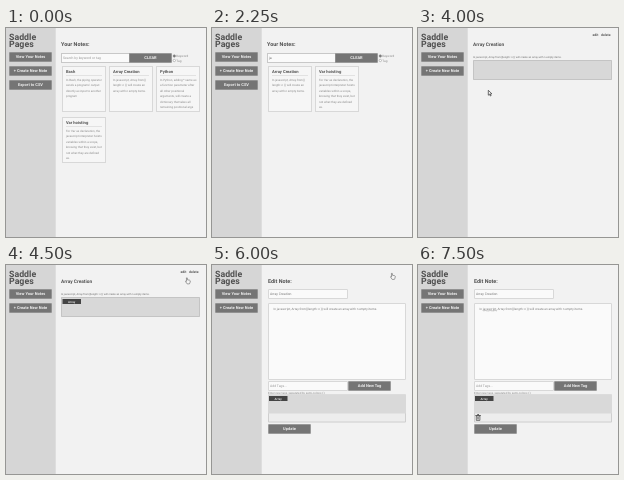
Animation, 200 px wide and 209 px high, one loop 8 s. Source, as an HTML page with a canvas:

```html
<!DOCTYPE html>
<html lang="en">
<head>
<meta charset="utf-8">
<title>Saddle Pages</title>
<style>
html, body { margin: 0; width: 100%; height: 100%; overflow: hidden; background: #f2f2f2; }
canvas { display: block; width: 200px; height: 209px; }
</style>
</head>
<body>
<canvas id="stage"></canvas>
<script>
const W = 200, H = 209, LOOP = 8000;
const canvas = document.getElementById('stage');
const ctx = canvas.getContext('2d');
const dpr = window.devicePixelRatio || 1;
canvas.width = W * dpr;
canvas.height = H * dpr;

const INK = '#505050', BODY = '#858585', BUTTON = '#757575', EDGE = '#d8d8d8', FIELD = '#fafafa';
const SNIPPET = 'In javascript, Array.from({length: n }) will create an array with n empty items.';

const NOTES = {
  bash: ['Bash', 'In Bash, the piping operator', "sends a programs' output", 'directly as input to another', 'program'],
  array: ['Array Creation', 'In javascript, Array.from({', 'length: n }) will create an', 'array with n empty items.'],
  python: ['Python', 'In Python, adding * same as', 'a function parameter after', 'all other positional', 'arguments, will create a', 'dictionary that takes all', 'remaining positional args'],
  hoist: ['Var hoisting', 'For Var as declaration, the', 'javascript interpreter hoists', 'variables within a scope,', 'knowing that they exist, but', 'not what they are defined', 'as.']
};

// Pointer steps: [start ms, kind, x, y]
const POINTER = [
  [0, 'none', 0, 0],
  [3250, 'hand', 69, 60],
  [3500, 'hand', 69, 63],
  [3750, 'hand', 69, 62],
  [4000, 'arrow', 70, 62],
  [4250, 'beam', 145, 28],
  [4500, 'hand', 179, 12.5],
  [4750, 'hand', 178, 9],
  [5000, 'hand', 178, 8],
  [6250, 'arrow', 165, 19],
  [6500, 'none', 0, 0]
];

// Glyphs are laid out large and scaled down so that tiny sizes keep true spacing.
function text(str, x, y, size, color = BODY, weight = 400, align = 'left') {
  const zoom = 10;
  ctx.save();
  ctx.translate(x, y);
  ctx.scale(1 / zoom, 1 / zoom);
  ctx.font = `${weight} ${size * zoom}px Roboto, sans-serif`;
  ctx.textRendering = 'geometricPrecision';
  ctx.textAlign = align;
  ctx.fillStyle = color;
  ctx.fillText(str, 0, 0);
  ctx.restore();
}

function rect(x, y, w, h, fill, stroke) {
  ctx.fillStyle = fill;
  ctx.fillRect(x, y, w, h);
  if (!stroke) return;
  ctx.strokeStyle = stroke;
  ctx.lineWidth = 1;
  ctx.strokeRect(x + 0.5, y + 0.5, w - 1, h - 1);
}

function button(label, x, y, w = 43, h = 10) {
  rect(x + 0.3, y + 0.3, w - 0.6, h - 0.6, BUTTON);
  text(label, x + w / 2, y + h / 2 + 1.4, 4, '#f0f0f0', 700, 'center');
}

function caret(x, y) {
  rect(x, y, 0.6, 3.4, '#444');
}

function tag(x, y) {
  rect(x, y, 18.5, 5, '#444');
  text('Array', x + 9.2, y + 3.5, 3, '#ddd', 700, 'center');
}

function sidebar(withExport) {
  rect(0, 0, 49.7, H, '#d6d6d6');
  text('Saddle', 3, 12, 8.8, INK, 700);
  text('Pages', 3, 19, 8.8, INK, 700);
  button('View Your Notes', 3, 24);
  button('+ Create New Note', 3, 38);
  if (withExport) button('Export to CSV', 3, 52);
}

function card(note, x, y) {
  const [title, ...lines] = note;
  rect(x, y, 44, 46, '#f6f6f6', EDGE);
  text(title, x + 4, y + 7.3, 4.1, INK, 700);
  rect(x + 4, y + 9.3, 36, 0.5, '#ccc');
  lines.forEach((line, i) => text(line, x + 4, y + 15 + i * 5.4, 2.95));
}

function radio(label, y, on) {
  ctx.beginPath();
  ctx.arc(168.3, y, 1.2, 0, Math.PI * 2);
  ctx.fillStyle = on ? '#777' : '#fff';
  ctx.fill();
  ctx.strokeStyle = '#888';
  ctx.lineWidth = 0.5;
  ctx.stroke();
  text(label, 170.3, y + 1, 3.1);
}

function listPage(t) {
  const filtered = t >= 2250;
  sidebar(true);
  text('Your Notes:', 55, 18, 5.4, INK, 700);
  rect(55, 25, 69, 10, FIELD, '#c8c8c8');
  button('CLEAR', 123, 25);
  radio('Keyword', 28, true);
  radio('Tag', 32.5, false);

  if (!filtered) {
    text('Search by keyword or tag', 57, 31, 3.4, '#959595');
    if (t >= 750 && t < 1750) caret(57, 28);
    card(NOTES.bash, 56, 38);
    card(NOTES.array, 103, 38);
    card(NOTES.python, 150, 38);
    card(NOTES.hoist, 56, 89);
    return;
  }
  text(t < 2500 ? 'ja' : 'java', 57, 31, 3.4, '#666');
  if ((t >= 2500 && t < 3000) || (t >= 3500 && t < 3750)) caret(62.6, 28);
  card(NOTES.array, 56, 38);
  card(NOTES.hoist, 103, 38);
}

function notePage(t) {
  sidebar(false);
  text('Array Creation', 55, 17.6, 4.8, INK, 700);
  text('edit', 174.5, 8, 3.4, INK, 700);
  text('delete', 183, 8, 3.4, INK, 700);
  text(SNIPPET, 55, 30, 2.65, '#666');
  rect(55, 32, 139, 20, '#d8d8d8', '#c4c4c4');
  if (t >= 4250) tag(56.5, 34);
}

function trashCan() {
  ctx.strokeStyle = '#444';
  ctx.lineWidth = 0.7;
  ctx.strokeRect(58.3, 151, 3.6, 4.4);
  rect(57.3, 150, 5.6, 0.8, '#444');
  rect(59.2, 149.2, 1.8, 0.8, '#444');
  rect(59.3, 152, 0.5, 2.5, '#444');
  rect(60.5, 152, 0.5, 2.5, '#444');
}

function squiggle(x0, x1, y) {
  ctx.beginPath();
  for (let x = x0; x <= x1; x += 0.25) ctx.lineTo(x, y + 0.25 * Math.sin(x * 5));
  ctx.strokeStyle = '#888';
  ctx.lineWidth = 0.5;
  ctx.stroke();
}

function editPage(t) {
  sidebar(false);
  text('Edit Note:', 56, 18, 5.4, INK, 700);
  rect(56, 24, 80, 10, FIELD, EDGE);
  text('Array Creation', 58, 30.2, 3.4, '#757575');
  rect(56, 38, 138, 77, FIELD, EDGE);
  text(SNIPPET, 61.5, 45, 3.1, '#757575');
  if (t >= 7000) squiggle(65, 79, 45.8);
  if (t >= 7000 && t < 7500) caret(166.3, 42);

  rect(56, 116, 80, 10, FIELD, EDGE);
  text('Add Tags...', 58, 122.2, 3.4, '#959595');
  button('Add New Tag', 136, 116);
  text('Enter new tags, separated by semi-colons (;)', 56, 128.8, 2.9);
  rect(56, 129.5, 138, 28, '#ededed', '#cfcfcf');
  rect(56, 129.5, 138, 19, '#d9d9d9');
  tag(57, 131);
  if (t >= 6750) trashCan();
  button('Update', 56, 159);
}

function shape(points, x, y, outline, width) {
  ctx.beginPath();
  points.forEach(([px, py]) => ctx.lineTo(x + px, y + py));
  ctx.closePath();
  ctx.lineJoin = 'round';
  ctx.lineWidth = width;
  ctx.strokeStyle = outline;
  ctx.fillStyle = '#f6f6f6';
  ctx.fill();
  ctx.stroke();
}

const ARROW = [[0.3, 0.3], [0.3, 5.2], [1.5, 4.2], [2.3, 6], [3.1, 5.6], [2.3, 3.9], [3.9, 3.8]];
const HAND = [[1.4, 0.4], [2.3, 0.4], [2.5, 2.3], [4.6, 2.7], [5.3, 3.3], [5, 5.1], [4.4, 6.4], [2.2, 6.4], [0.5, 4], [0.8, 3.4], [1.6, 3.8]];

function pointer(t) {
  const [, kind, x, y] = POINTER.filter(step => step[0] <= t).pop();
  if (kind === 'hand') shape(HAND, x, y, '#555', 0.55);
  if (kind === 'arrow') shape(ARROW, x, y, '#333', 0.7);
  if (kind === 'beam') rect(x, y, 0.7, 2.5, '#333');
}

function draw(t) {
  ctx.setTransform(dpr, 0, 0, dpr, 0, 0);
  rect(0, 0, W, H, '#f2f2f2');
  if (t < 4000) listPage(t);
  else if (t < 6000) notePage(t);
  else editPage(t);
  pointer(t);
}

const start = performance.now();
function tick() {
  draw((performance.now() - start) % LOOP);
  requestAnimationFrame(tick);
}
tick();
</script>
</body>
</html>
```
